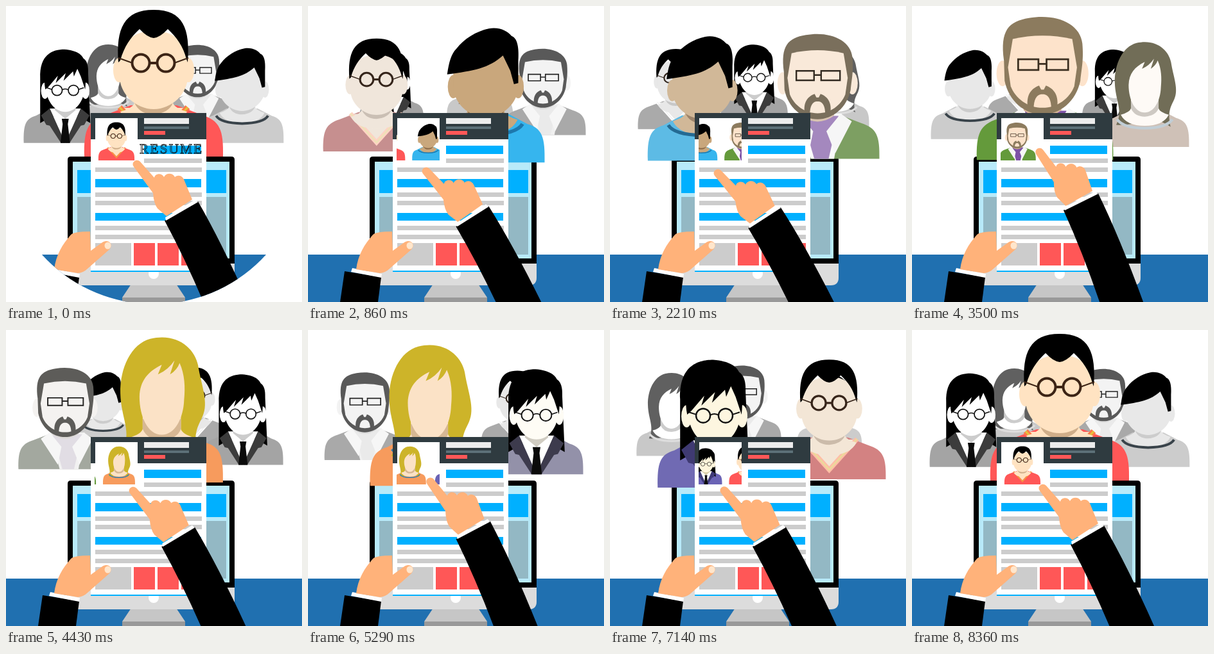
Write an HTML page with a canvas that moves like this. It is 461 px wide and 462 px high and loops after 8430 ms.

```html
<!DOCTYPE html>
<html lang="en">
<head>
<meta charset="utf-8">
<title>Choosing a candidate</title>
<style>
html, body { margin: 0; height: 100%; overflow: hidden; background: #fff; }
canvas { display: block; }
</style>
</head>
<body>
<canvas id="stage" width="461" height="462"></canvas>
<script>
const ctx = document.getElementById('stage').getContext('2d');
const LOOP = 8430, STEP = LOOP / 5, TURN = 1130;

const fill = (d, color) => { ctx.fillStyle = color; ctx.fill(new Path2D(d)); };
const line = (d, color, w) => { ctx.strokeStyle = color; ctx.lineWidth = w; ctx.stroke(new Path2D(d)); };
const rect = (x, y, x2, y2, color) => { ctx.fillStyle = color; ctx.fillRect(x, y, x2 - x, y2 - y); };
const oval = (x, y, rx, ry, color) => {
  ctx.fillStyle = color;
  ctx.beginPath();
  ctx.ellipse(x, y, rx, ry, 0, 0, 7);
  ctx.fill();
};
const ring = (x, y, r, color, w) => {
  ctx.strokeStyle = color;
  ctx.lineWidth = w;
  ctx.beginPath();
  ctx.arc(x, y, r, 0, 7);
  ctx.stroke();
};
const clamp = v => Math.max(0, Math.min(1, v));
const rgb = hex => [1, 3, 5].map(i => parseInt(hex.slice(i, i + 2), 16));
const mixer = amount => (color, gray) => {
  const b = rgb(gray);
  return `rgb(${rgb(color).map((v, i) => Math.round(b[i] + (v - b[i]) * amount))})`;
};

// People: origin at the middle of the lower edge, full size at the front
const SLIM = 'M-96,0C-97,-42 -92,-56 -68,-63L-36,-80H36L68,-63C92,-56 97,-42 96,0Z';
const BROAD = 'M-108,0C-109,-42 -103,-56 -75,-65L-36,-80H36L75,-65C103,-56 109,-42 108,0Z';
const HEAD = 'M-53,-150C-53,-212 53,-212 53,-150V-125C53,-98 28,-74 0,-74C-28,-74 -53,-98 -53,-125Z';
const ears = (x, y, color) => [-x, x].forEach(ex => oval(ex, y, 9, 19, color));
function neck(skin, shade) {
  fill('M-30,-105V-84Q-32,-76 -52,-70Q-40,-46 0,-46Q40,-46 52,-70Q32,-76 30,-84V-105Z', skin);
  fill('M-30,-100V-84Q-22,-66 0,-66Q24,-68 30,-84V-100Z', shade);
}

function vneckMan(c) {
  const skin = c('#ffe3c2', '#e8e8e8'), frame = c('#3c2415', '#32261e');
  fill(BROAD, c('#ff5757', '#aaaaaa'));
  fill('M-52,-76L0,-18L52,-76Z', skin);
  line('M-53,-77L0,-18L53,-77', c('#ff7a48', '#ffffff'), 9);
  line('M-53,-77L0,-18L53,-77', c('#e2c43c', '#f2f2f2'), 3);
  neck(skin, c('#cfae8a', '#c8c8c8'));
  ears(54, -135, skin);
  fill(HEAD, skin);
  fill('M-55,-147C-59,-200 -46,-229 0,-229C46,-229 57,-200 53,-147L51,-152C46,-172 36,-186 22,-199Q10,-186 0,-185Q-10,-186 -22,-199C-36,-186 -46,-172 -52,-150Z', '#000');
  ring(-20, -146, 13.5, frame, 4);
  ring(19, -146, 13.5, frame, 4);
  line('M-7,-146H6', frame, 4);
  line('M-33,-146L-55,-154M32,-146L54,-154', frame, 2);
}

function sweptMan(c) {
  const skin = c('#c9a77c', '#e8e8e8');
  fill(SLIM, c('#36b5ee', '#cccccc'));
  neck(skin, c('#8d6b49', '#cccccc'));
  line('M-60,-63Q-50,-46 0,-45Q50,-46 60,-63', c('#1d78ad', '#39434a'), 6);
  ears(53, -124, skin);
  fill(HEAD, skin);
  fill('M-63,-144C-60,-165 -56,-178 -48,-186C-36,-202 -15,-215 5,-219C24,-222 36,-214 42,-207C54,-203 54,-180 53,-165L53,-130L46,-128L40,-150L28,-175C5,-154 -20,-150 -63,-144Z', '#000');
}

function beardedMan(c) {
  const skin = c('#fde3cb', '#f3f3f3'), hair = c('#8c7b5e', '#595959'), frame = c('#3b2f20', '#222222');
  fill(BROAD, c('#649a3b', '#a9a9a9'));
  fill('M-38,-82L-16,0H26L40,-82Z', c('#ffffff', '#f0f0f0'));
  fill('M-32,-78L-10,0H16L34,-78Z', c('#7d52a6', '#eaeaea'));
  fill('M-38,-82L-58,-68L-20,-10L-12,-50ZM38,-82L58,-68L28,-10L12,-50Z', '#f6f6f6');
  ctx.translate(-4, 3);
  ctx.scale(1.07, 1.07);
  fill('M-28,-100V-76Q0,-56 28,-76V-100Z', c('#d5b497', '#dddddd'));
  ears(59, -131, skin);
  fill('M-57,-150C-63,-195 -50,-208 -20,-213C20,-220 56,-205 59,-175C61,-150 58,-140 56,-120C50,-90 26,-70 0,-70C-26,-70 -50,-90 -56,-120Z', hair);
  fill('M-44,-182Q0,-192 44,-182L51,-140L47,-112C40,-94 22,-80 0,-80C-22,-80 -40,-94 -47,-112L-51,-140Z', skin);
  fill('M-22,-82C-24,-100 -16,-109 -5,-113L-2,-107H2L5,-113C16,-109 24,-100 22,-82L13,-78C13,-92 9,-99 2,-100H-2C-9,-99 -13,-92 -13,-78Z', hair);
  line('M-36,-152H-6V-136H-36ZM6,-152H38V-136H6ZM-6,-145H6', frame, 2.6);
}

function longHairWoman(c) {
  const skin = c('#fbe2c6', '#ffffff'), hair = c('#cdb429', '#606060');
  fill(SLIM, c('#f79b5d', '#c8c8c8'));
  fill('M-18,-226C25,-236 52,-210 57,-184C62,-152 74,-126 64,-104C58,-90 48,-78 56,-44Q20,-66 0,-60Q-30,-46 -62,-48C-46,-80 -64,-100 -65,-140C-66,-180 -48,-218 -18,-226Z', hair);
  neck(skin, c('#d6b794', '#cccccc'));
  line('M-60,-60Q-46,-41 0,-41Q46,-41 60,-60', c('#2f7fb0', '#dddddd'), 6);
  fill('M-35,-135C-34,-160 -22,-174 0,-185L-6,-170Q10,-177 20,-192L13,-170Q24,-177 28,-188C36,-170 37,-150 35,-130C34,-100 20,-75 0,-75C-22,-75 -35,-104 -35,-135Z', skin);
}

function suitWoman(c) {
  const skin = c('#fdf5dc', '#ffffff');
  fill(SLIM, c('#6a63b5', '#a4a4a4'));
  fill('M-58,-46V-150C-60,-205 -30,-217 -2,-217C26,-215 38,-205 42,-196C54,-188 53,-170 53,-160L58,-46L34,-60H-34Z', '#000');
  fill('M-36,-80L0,0L36,-80Z', '#fff');
  fill('M-36,-80L-56,-64L-44,-42L-36,-40L-10,0H0ZM36,-80L56,-64L44,-42L36,-40L10,0H0Z', c('#3f3a78', '#3c3c3c'));
  fill('M-24,-100V-76L0,-56L24,-76V-100Z', c('#d9cda8', '#cccccc'));
  fill('M-8,-56H8L6,-44L11,0H-11L-6,-44Z', '#0b0b0b');
  ears(47, -121, skin);
  fill('M-44,-150C-40,-200 40,-200 44,-150V-122C42,-96 24,-72 0,-72C-24,-72 -42,-96 -44,-122Z', skin);
  fill('M-46,-124C-54,-165 -38,-198 0,-206C36,-200 52,-168 46,-124L36,-154L28,-172L20,-154L18,-166L-4,-144L1,-162L-22,-139L-17,-156L-39,-130Z', '#000');
  ring(-19, -122, 12, '#111', 2.6);
  ring(19, -122, 12, '#111', 2.6);
  line('M-7,-123Q0,-127 7,-123M-31,-124L-43,-128M31,-124L43,-128', '#111', 2.2);
}

const people = [vneckMan, sweptMan, beardedMan, longHairWoman, suitWoman];

function place(draw, x, y, scale, tint) {
  ctx.save();
  ctx.translate(x, y);
  ctx.scale(scale, scale);
  draw(mixer(tint));
  ctx.restore();
}

function carousel(phase) {
  people.map((draw, i) => {
    const turn = ((i - phase + 7.5) % 5 - 2.5) * 72;
    return { draw, deg: Math.abs(turn), rad: turn * Math.PI / 180, c: Math.cos(turn * Math.PI / 180) };
  }).sort((a, b) => a.c - b.c).forEach(({ draw, deg, rad, c }) => {
    const lift = clamp(1 - deg / 24);
    const scale = (0.61 + 0.22 * c + 0.17 * c * c) * (0.97 + 0.03 * lift);
    place(draw, 230 + (138 + 22 * c) * Math.sin(rad), 201 + 37 * c + 14 * c * c - 17 * lift, scale, clamp((72 - deg) / 52));
  });
}

function computer() {
  rect(0, 388, 461, 462, '#2070b0');
  fill('M195,434H265L279,455V462H181V455Z', '#c6c6c6');
  rect(181, 455, 279, 462, '#999');
  fill('M101,235H351Q356,235 356,240V404H96V240Q96,235 101,235Z', '#000');
  rect(104, 243, 348, 394, '#b8eaf9');
  rect(111, 256, 343, 292, '#00b0ff');
  rect(111, 298, 343, 388, '#93b8c4');
  fill('M96,402H356V424Q356,436 344,436H108Q96,436 96,424Z', '#dcdcdc');
}

function resume(phase) {
  const blue = '#00b0ff', gray = '#ccc', red = '#ff5757';
  oval(230, 418, 8, 8, '#fff');
  rect(132, 167, 312, 415, '#fff');
  rect(132, 413, 312, 415, blue);
  rect(132, 167, 312, 208, '#2f3b40');
  rect(139, 175, 205, 241, '#fff');
  ctx.save();
  ctx.beginPath();
  ctx.rect(138, 175, 67, 66);
  ctx.clip();
  for (let i = -1; i <= 5; i++) {
    place(people[(i + 5) % 5], 172 + (i - phase) * 64, 241, 0.26, 1);
  }
  ctx.restore();
  rect(215, 175, 285, 184, '#ececec');
  rect(215, 188, 285, 192, '#5c7078');
  rect(215, 195, 248, 201, red);
  rect(215, 218, 304, 231, blue);
  rect(215, 238, 305, 245, gray);
  rect(139, 270, 304, 283, blue);
  rect(139, 323, 304, 335, blue);
  [252, 291, 304, 343, 357].forEach(y => rect(139, y, 305, y + 7, gray));
  rect(139, 370, 195, 405, gray);
  [199, 236, 273].forEach(x => rect(x, 370, Math.min(x + 33, 305), 405, red));
}

function leftHand() {
  fill('M57,414L114,423L109,462H50Z', '#000');
  fill('M69,409L115,418L114,424L67,415Z', '#fff');
  fill('M75,411C78,388 88,372 101,357Q106,352 131,352L132,382L150,369C160,363 168,372 161,380L127,410Q121,416 112,417Z', '#ffb27a');
  oval(158.5, 374, 5, 5.5, '#ffe6cc');
}

// The forearm swings a little as the hand rises
function rightHand(x, y) {
  ctx.save();
  ctx.translate(x, y);
  ctx.rotate((246 - y) * 0.0035);
  ctx.translate(-203, -246);
  fill('M247,335L299,305Q345,385 400,515H329Q290,415 247,335Z', '#000');
  fill('M248,330L295,302L299,306L249,335Z', '#fff');
  fill('M199,251C194,244 203,237 209,243L231,268C232,261 243,260 246,267C249,260 260,260 263,267C269,262 276,266 278,273L290,302L250,328L236,316Q230,308 229,292Z', '#ffb27a');
  ctx.restore();
}

// Fingertip through one step: ms, x, y
const swipe = [[0, 204, 226], [128, 198, 227], [524, 167, 260], [860, 183, 257], [1058, 197, 250], [TURN, 203, 246], [STEP, 204, 226]];
function fingertip(time) {
  const k = Math.max(1, swipe.findIndex(p => p[0] >= time));
  const [t0, x0, y0] = swipe[k - 1], [t1, x1, y1] = swipe[k];
  const u = (time - t0) / (t1 - t0);
  return [x0 + (x1 - x0) * u, y0 + (y1 - y0) * u];
}

function title() {
  ctx.font = '21px "Liberation Serif", serif';
  ctx.letterSpacing = '2.4px';
  ctx.strokeStyle = '#111';
  ctx.lineWidth = 0.8;
  ctx.strokeText('RESUME', 208, 230);
}

function render(now) {
  const t = now % LOOP, poster = t < 70;
  const step = poster ? 4 : Math.floor(t / STEP);
  const local = poster ? TURN : t - step * STEP;
  const time = step === 4 ? Math.min(local, TURN) : local;
  const phase = (step + Math.min(time / TURN, 1)) % 5;

  rect(0, 0, 461, 462, '#fff');
  ctx.save();
  if (poster) {
    ctx.beginPath();
    ctx.arc(230.5, 230, 235.5, 0, 7);
    ctx.clip();
  }
  computer();
  carousel(phase);
  resume(phase);
  leftHand();
  rightHand(...fingertip(time));
  ctx.restore();
  if (poster || (t >= 8210 && t < 8360)) title();
  requestAnimationFrame(render);
}
requestAnimationFrame(render);
</script>
</body>
</html>
```
